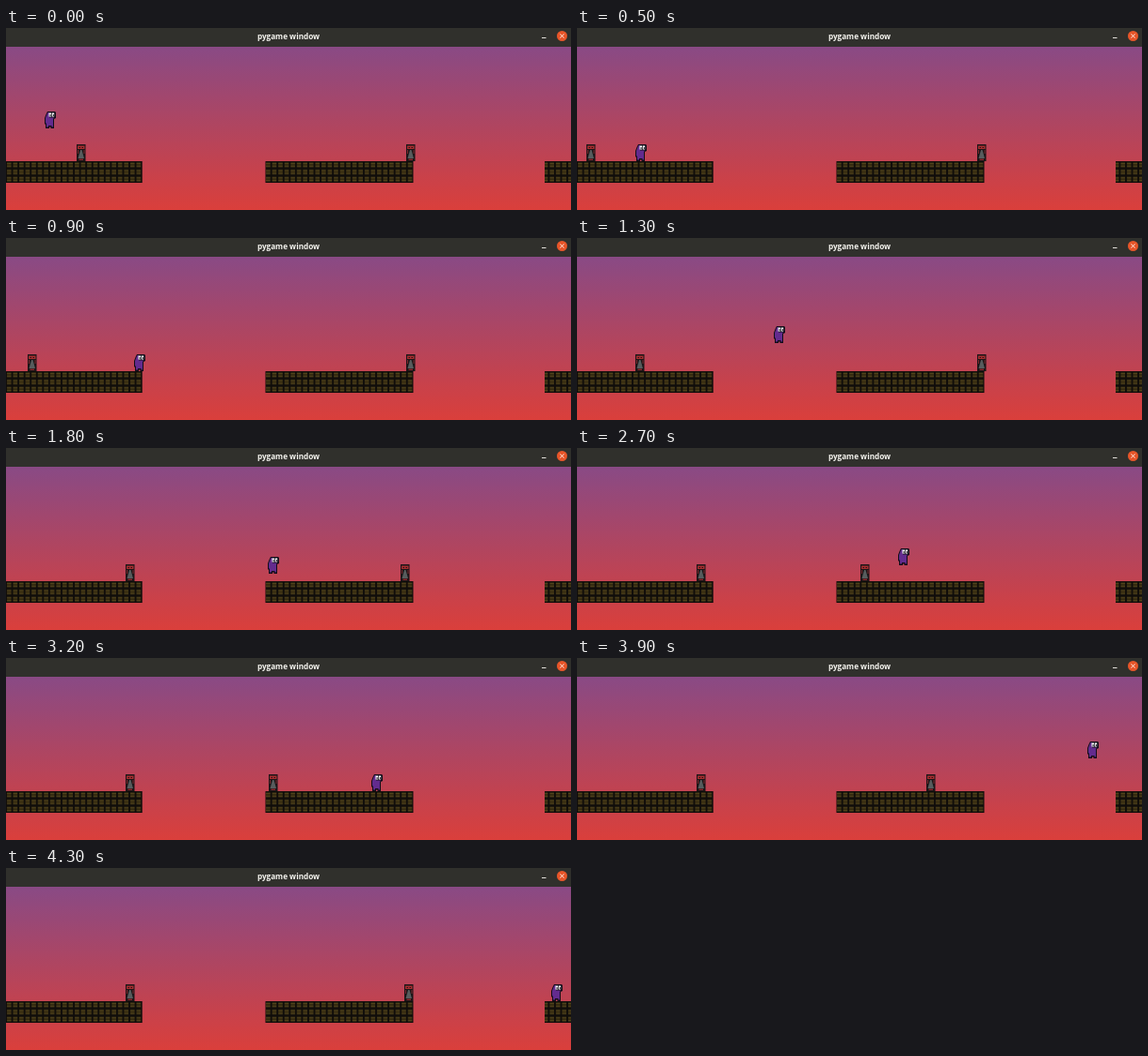
Recreate the animation shown at these times as an HTML page. Size 600 by 194 pixels, loop 4600 ms.

```html
<!DOCTYPE html>
<html lang="en">
<head>
<meta charset="utf-8">
<title>pygame window</title>
<style>
  html, body { margin: 0; width: 100%; height: 100%; overflow: hidden; background: #30302c; }
  svg { display: block; width: 600px; height: 194px; }
  .title { font: bold 8.2px "Open Sans", "Noto Sans", sans-serif; fill: #f6f5f0; text-anchor: middle; }
</style>
</head>
<body>
<svg viewBox="0 0 600 194">
  <defs>
    <linearGradient id="sky" x1="0" y1="0" x2="0" y2="1">
      <stop offset="0" stop-color="#894a85"/>
      <stop offset="0.5" stop-color="#b1455f"/>
      <stop offset="1" stop-color="#da3f3b"/>
    </linearGradient>
    <pattern id="brick" width="6.55" height="7.67" patternUnits="userSpaceOnUse">
      <rect width="6.55" height="7.67" fill="#100d0a"/>
      <rect x="1" y="1.6" width="4.6" height="4.6" fill="#33290f"/>
      <path d="M1 2.2H5.6M1 5.6H5.6" stroke="#5c4c20"/>
    </pattern>
    <g id="enemy">
      <rect width="9.5" height="18" fill="#1b1517"/>
      <path d="M1 1.5H8.5V5H1Z" fill="#a52d2f"/>
      <path d="M2.5 3H4V4H2.5ZM5.5 3H7V4H5.5Z" fill="#2a1012"/>
      <path d="M4 6H5.5L8 15H1.5Z" fill="#575c5d"/>
      <path d="M1 6H2V10H1ZM7.5 6H8.5V10H7.5Z" fill="#7c2a2e"/>
      <path d="M2.5 15.5H7V17H2.5Z" fill="#85292c"/>
    </g>
    <g id="hero">
      <path d="M3 0H11L12 1V7L10 8V18H6.5V16.5H5V18H1V14L0 13V7L1.5 3Z" fill="#120d18"/>
      <path d="M3.5 1H5V6.5H10L9 8V16.5H7.5V15H4V16.5H2V13L1 12V7L2.5 3Z" fill="#632b8e"/>
      <path d="M4.5 1.5H7V5.5H4.5ZM7.7 1.5H10.2V5.5H7.7Z" fill="#fff"/>
      <path d="M5.6 3H6.6V5H5.6ZM8.8 3H9.8V5H8.8Z" fill="#120d18"/>
    </g>
  </defs>

  <rect y="20" width="600" height="174" fill="url(#sky)"/>
  <rect width="600" height="20" fill="#30302c"/>
  <text class="title" x="300" y="12">pygame window</text>
  <path d="M569 10.5H573.5" stroke="#e4e2dc"/>
  <circle cx="590.5" cy="8.5" r="5.5" fill="#e8562a"/>
  <path d="M588.5 6.5L592.5 10.5M592.5 6.5L588.5 10.5" stroke="#fff" stroke-width=".9"/>

  <g fill="url(#brick)" transform="translate(0 142)">
    <rect width="144.7" height="23"/>
    <rect x="275.5" width="157" height="23"/>
    <rect x="572" width="28" height="23"/>
  </g>
  <use id="enemyA" href="#enemy"/>
  <use id="enemyB" href="#enemy"/>
  <use id="player" href="#hero"/>
</svg>
<script>
const LOOP = 4600, STEP = 100, LAST = 43;
const HELD = [10, 20, 29, 34];  // steps that repeat the previous pose
const GROUND = 124, JUMP_HEIGHT = 35.5, JUMP_HALF = 3.9;
const JUMP_PEAKS = [0, 14.55, 24.15, 38.6];
const PATROL_SPEED = 13.1;

// where the player changes pace: [step, x]
const RUN = [[0, 41], [4.5, 53], [13, 209], [16, 259], [23, 325], [30, 353], [32, 388], [39, 542], [43, 579]];

function playerX(step) {
  const i = Math.max(1, RUN.findIndex(([s]) => s >= step));
  const [s0, x0] = RUN[i - 1], [s1, x1] = RUN[i];
  return x0 + (x1 - x0) * (step - s0) / (s1 - s0);
}

function playerY(step) {
  const away = Math.min(1, ...JUMP_PEAKS.map(peak => Math.abs(step - peak) / JUMP_HALF));
  return GROUND - JUMP_HEIGHT * (1 - away ** 2);
}

// Walk to the left end, rest there, walk back; never beyond the range.
function patrolX(step, left, range, arrive, leave) {
  return left + Math.min(range, PATROL_SPEED * Math.max(arrive - step, 0, step - leave));
}

function place(id, x, y) {
  document.getElementById(id).setAttribute("transform", `translate(${Math.round(x)} ${Math.round(y)})`);
}

function draw(time) {
  let step = Math.min(LAST, Math.floor(time % LOOP / STEP));
  if (HELD.includes(step)) step--;
  const delayed = step > HELD[0] ? step - 1 : step;  // the first enemy loses a beat at the first hold
  place("enemyA", patrolX(delayed, 3, 124, 5.5, 7.5), GROUND);
  place("enemyB", patrolX(step, 278, 147, 28.75, 31.9), GROUND);
  place("player", playerX(step), playerY(step));
}

const start = performance.now();
function tick() {
  draw(performance.now() - start);
  requestAnimationFrame(tick);
}
tick();
</script>
</body>
</html>
```
